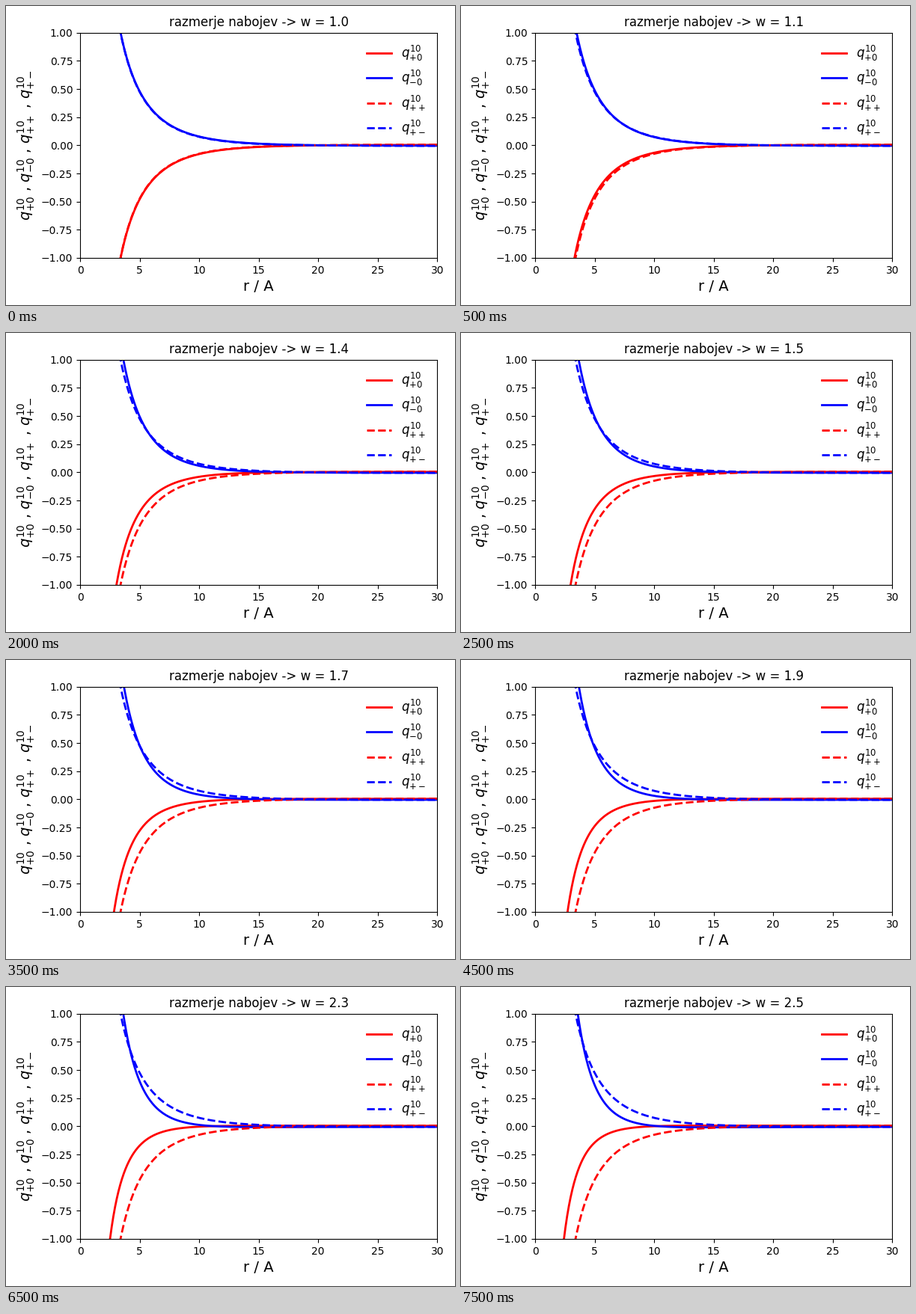
These frames come from a looping animation (600 px wide and 400 px high, 8 s). A matplotlib script:

```python
import numpy as np
import matplotlib.pyplot as plt
from matplotlib.animation import FuncAnimation

FRAMES, STEP_MS = 16, 500
BJERRUM = 7.15   # interaction length
OFFSET = 0.004   # residual charge far away

r = np.linspace(1, 30, 600)


def screened(k, tail=0.0):
    return BJERRUM * np.exp(-k * r) / r - tail * np.exp(-r / 7)


fig = plt.figure(figsize=(6, 4), dpi=100)
ax = fig.add_axes([99 / 600, 63 / 400, 477.3 / 600, 301.3 / 400])

keys = [r"$q_{+0}^{10}$", r"$q_{-0}^{10}$", r"$q_{++}^{10}$", r"$q_{+-}^{10}$"]
styles = ["r-", "b-", "r--", "b--"]
red, blue, red_ref, blue_ref = (
    ax.plot(r, 0 * r, s, lw=2, label=key)[0] for s, key in zip(styles, keys)
)

ref = screened(0.217, 0.006) - 0.005
red_ref.set_ydata(-ref)
blue_ref.set_ydata(ref)

ax.set_xlim(0, 30)
ax.set_ylim(-1, 1)
ax.set_xlabel("r / A", fontsize=14)
ax.set_ylabel(" , ".join(keys), fontsize=14)
ax.legend(loc="upper right", frameon=False, fontsize=12)
title = ax.set_title("", fontsize=12)


def update(i):
    w = 1 + 0.1 * i
    f = screened(0.217 + 0.147 * (w - 1), 0.016 * (w - 1))
    red.set_ydata(OFFSET - f)
    blue.set_ydata(w * f - OFFSET)
    title.set_text(f"razmerje nabojev -> w = {w:.1f}")
    return red, blue, title


anim = FuncAnimation(fig, update, frames=FRAMES, interval=STEP_MS,
                     repeat=True, repeat_delay=0, blit=False)
plt.show()
```
